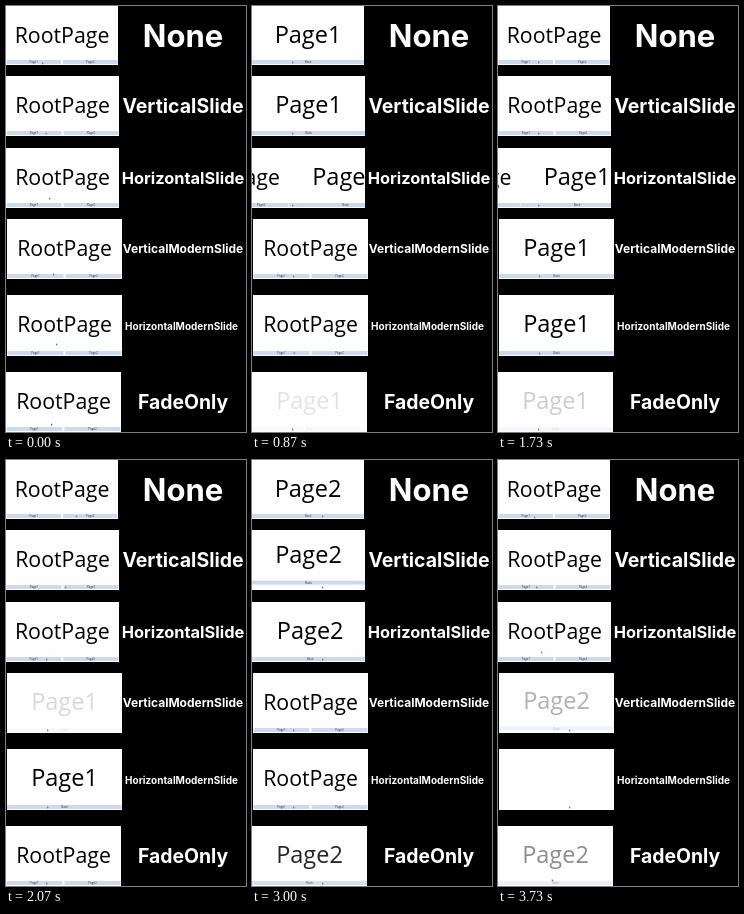
An HTML page with a canvas for the animation above (3790 ms loop, 240 by 426 pixels).

```html
<!DOCTYPE html>
<html lang="en">
<head>
<meta charset="utf-8">
<title>Page transitions</title>
<style>
html, body { margin: 0; width: 100%; height: 100%; overflow: hidden; background: #000; }
canvas { display: block; width: 240px; height: 426px; }
</style>
</head>
<body>
<canvas id="stage" width="240" height="426"></canvas>
<script>
const ctx = document.getElementById('stage').getContext('2d');
const LOOP = 3790;
const DURATION = 400;
const BASELINE = 37;
const PAGES = ['RootPage', 'Page1', 'Page2'];

// steps: [start time, page index]; cursor: [resting x, resting y]
const rows = [
  { label: 'None', size: 31, mid: 30, x: 0, y: 0, w: 112, h: 59, kind: 'none',
    steps: [[800, 1], [1450, 0], [2150, 2], [3350, 0]], cursor: [36, 57] },
  { label: 'VerticalSlide', size: 19.5, mid: 100, x: 0, y: 70, w: 113, h: 60, kind: 'slideY',
    steps: [[170, 1], [1146, 0], [2333, 2], [2986, 0]], cursor: [38, 57] },
  { label: 'HorizontalSlide', size: 16.4, mid: 172, x: 0, y: 142, w: 113, h: 60, kind: 'slideX',
    steps: [[700, 1], [1689, 0], [2650, 2], [3250, 0]], cursor: [43, 50] },
  { label: 'VerticalModernSlide', size: 12, mid: 243, x: 1, y: 213, w: 115, h: 60, kind: 'modernY',
    steps: [[910, 1], [1900, 0], [3470, 2]], cursor: [46, 55] },
  { label: 'HorizontalModernSlide', size: 10, mid: 320, x: 1, y: 289, w: 115, h: 61, kind: 'modernX',
    steps: [[1000, 1], [2150, 0], [3530, 2]], cursor: [49, 49] },
  { label: 'FadeOnly', size: 19.4, mid: 396, x: 0, y: 366, w: 115, h: 60, kind: 'fade',
    steps: [[650, 1], [1570, 0], [2630, 2], [3620, 0]], cursor: [45, 52] }
];

const clamp = v => Math.max(0, Math.min(1, v));
const easeOut = p => 1 - (1 - p) ** 2;
const mix = (a, b, p) => a + (b - a) * p;

function text(str, x, y, font, color) {
  ctx.font = font;
  ctx.fillStyle = color;
  ctx.fillText(str, x, y);
}

function drawButton(x, y, w, label) {
  ctx.fillStyle = '#cddaee';
  ctx.fillRect(x, y, w, 4);
  text(label, x + w / 2, y + 3, '3px "Open Sans", sans-serif', '#333');
}

function drawPage(row, page, dx = 0, dy = 0, alpha = 1) {
  const { w, h } = row;
  ctx.save();
  ctx.translate(dx, dy);
  ctx.globalAlpha = alpha;
  const size = page ? 23.5 : 21.3;
  text(PAGES[page], w / 2, BASELINE, `500 ${size}px "Open Sans", "Noto Sans", sans-serif`, '#000');
  if (page) {
    drawButton(0, h - 5, w, 'Back');
  } else {
    const half = w / 2 - 1.5;
    drawButton(0.5, h - 5, half, PAGES[1]);
    drawButton(half + 2.5, h - 5, half, PAGES[2]);
  }
  ctx.restore();
}

function drawTransition(row, from, to, p) {
  if (p >= 1 || row.kind === 'none') return drawPage(row, to);
  if (row.kind.startsWith('slide')) {
    const vertical = row.kind === 'slideY';
    const span = vertical ? -row.h : row.w;
    const e = easeOut(p);
    const child = span * (to ? 1 - e : e);
    const place = (page, d) => drawPage(row, page, vertical ? 0 : d, vertical ? d : 0);
    place(to || from, child);
    place(0, child - span);
    return;
  }
  // The old page fades away completely before the new one appears.
  if (p < 0.5) return drawPage(row, from, 0, 0, 1 - p * 2);
  const q = p * 2 - 1;
  const shift = (to ? 3 : -3) * (1 - q) ** 2;
  drawPage(row, to, row.kind === 'modernX' ? shift : 0, row.kind === 'modernY' ? -shift : 0, q);
}

function drawCursor(row, t) {
  const [restX, restY] = row.cursor;
  const first = row.steps[0][0], second = row.steps[2][0];
  const a = easeOut(clamp((t - first + 350) / 300));
  const b = easeOut(clamp((t - second + 400) / 350));
  const last = row.steps[3];
  const c = last ? easeOut(clamp((t - last[0] - 50) / 150)) : 0;
  const x = mix(mix(mix(restX, 40, a), 70, b), restX, c);
  const y = mix(mix(restY, row.h - 3, a), restY, c);
  ctx.fillStyle = '#777';
  ctx.beginPath();
  ctx.moveTo(x, y - 1);
  ctx.lineTo(x + 1.8, y + 1);
  ctx.lineTo(x, y + 1.6);
  ctx.fill();
}

function drawRow(row, t) {
  ctx.save();
  ctx.translate(row.x, row.y);
  ctx.beginPath();
  ctx.rect(0, 0, row.w, row.h);
  ctx.clip();
  ctx.fillStyle = '#fefefe';
  ctx.fillRect(0, 0, row.w, row.h);
  let from = 0, to = 0, start = -DURATION;
  for (const [time, page] of row.steps) {
    if (t < time) break;
    from = to;
    to = page;
    start = time;
  }
  drawTransition(row, from, to, clamp((t - start) / DURATION));
  drawCursor(row, t);
  ctx.restore();
  text(row.label, row.label === 'HorizontalModernSlide' ? 175.5 : 177, row.mid + row.size * 0.36,
    `700 ${row.size}px Inter, sans-serif`, '#fff');
}

function frame() {
  const t = performance.now() % LOOP;
  ctx.fillStyle = '#000';
  ctx.fillRect(0, 0, 240, 426);
  ctx.textAlign = 'center';
  rows.forEach(row => drawRow(row, t));
  requestAnimationFrame(frame);
}
frame();
</script>
</body>
</html>
```
